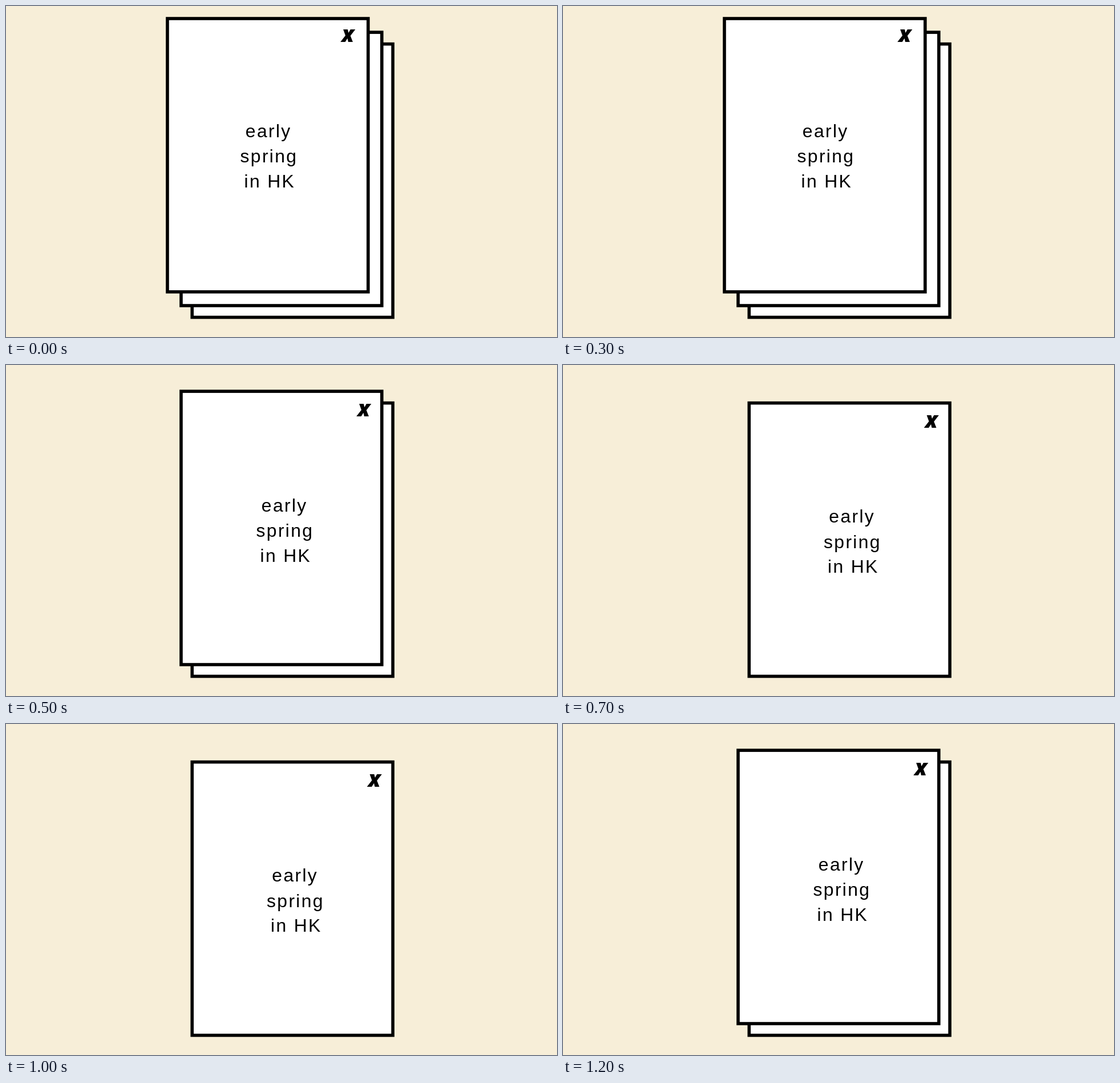
Write an HTML page that moves like this. It is 966 by 580 pixels and loops after 1.4 s.

```html
<!DOCTYPE html>
<html lang="en">
<head>
<meta charset="utf-8">
<title>Stacked cards</title>
<style>
  html, body { margin: 0; width: 100%; height: 100%; overflow: hidden; background: #f7eed8; }
  svg { display: block; width: 100%; height: 100%; }
  rect { fill: #fff; stroke: #000; stroke-width: 5.6; }
  text { font: 32px "Liberation Sans", Arial, sans-serif; letter-spacing: 2.3px; }
  .close { font: italic 800 38px "Open Sans", "Noto Sans", sans-serif; letter-spacing: 0; }

  .top, .middle, .middle-label { animation: 1400ms step-end infinite; }
  .top { animation-name: top; }
  .middle { animation-name: middle; }
  .middle-label { animation-name: middle-label; }

  /* The stack changes at 500, 700 and 1200 ms. */
  @keyframes top {
    0% { visibility: visible; }
    35.7143%, 100% { visibility: hidden; }
  }
  @keyframes middle {
    0% { opacity: 1; }
    50% { opacity: 0; }
    85.7143%, 100% { opacity: 1; }
  }
  @keyframes middle-label {
    0% { visibility: hidden; }
    35.7143%, 100% { visibility: visible; }
  }
</style>
</head>
<body>
<svg viewBox="0 0 966 580">
  <defs>
    <rect id="card" x="2.8" y="2.8" width="351.9" height="478.9"/>
    <g id="label">
      <text class="close" x="588.5" y="63">x</text>
      <text x="419.8" y="229.5">early</text>
      <text x="410.5" y="274">spring</text>
      <text x="417.5" y="317.5">in HK</text>
    </g>
  </defs>
  <g>
    <use href="#card" x="323.5" y="63.8"/>
    <use href="#label" x="46.5" y="46.5"/>
  </g>
  <g class="middle">
    <use href="#card" x="304.2" y="43.3"/>
    <use class="middle-label" href="#label" x="28" y="27.3"/>
  </g>
  <g class="top">
    <use href="#card" x="280.2" y="19.2"/>
    <use href="#label"/>
  </g>
</svg>
</body>
</html>
```
